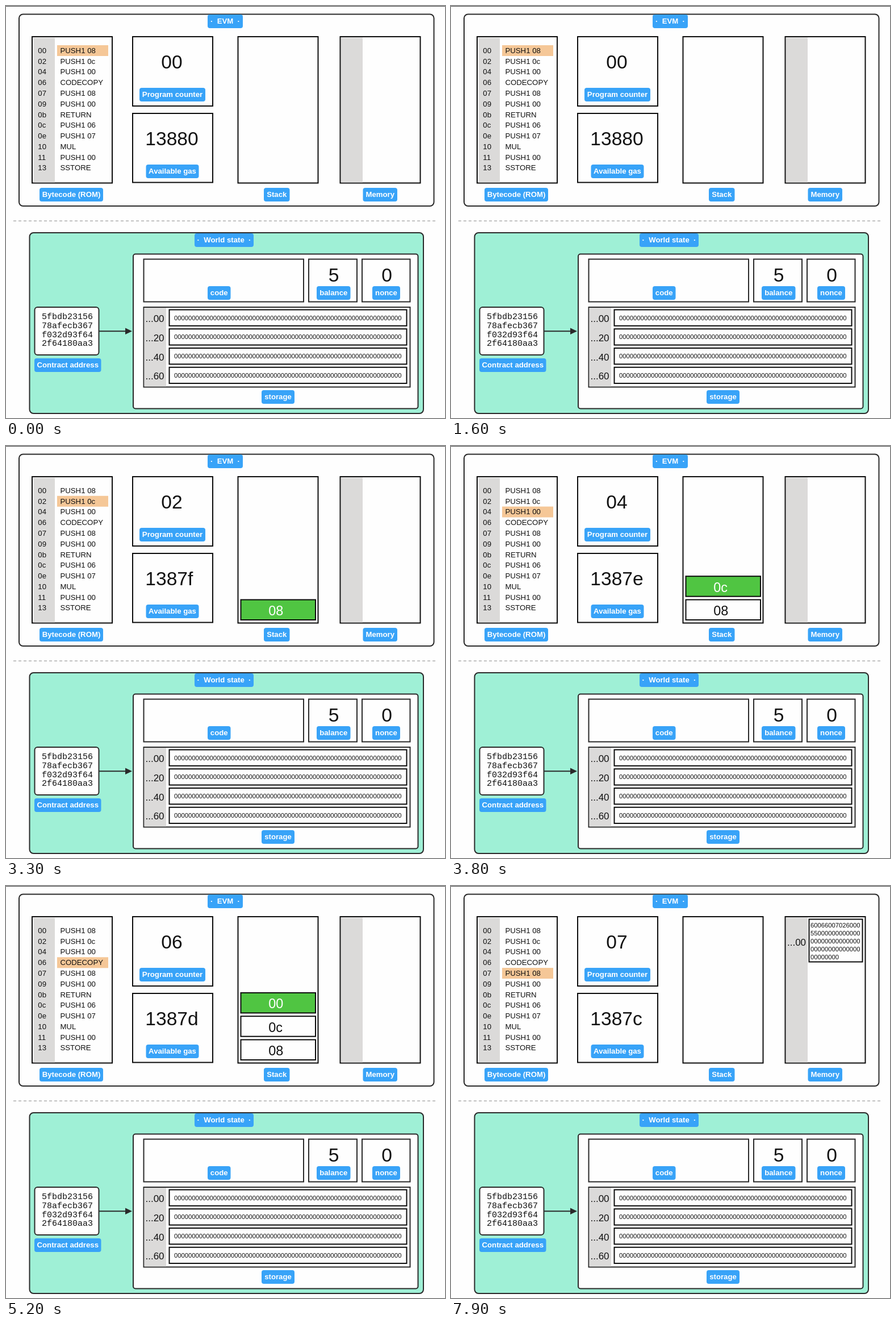
Write an HTML page that moves like this. It is 773 by 725 pixels and loops after 8 s.

```html
<!DOCTYPE html>
<html lang="en">
<head>
<meta charset="utf-8">
<title>EVM execution</title>
<style>
  html, body { margin: 0; width: 100%; height: 100%; overflow: hidden; background: #fefefe; }
  svg { display: block; width: 773px; height: 725px; }
  text { font-family: "Liberation Sans", Arial, sans-serif; fill: #111; white-space: pre; }
  .code { font-size: 13.2px; }
  .big { font-size: 33.6px; }
  .item { font-size: 23.4px; }
  .offset { font-size: 17px; }
  .word { font-size: 11.25px; }
  .mono { font: 15px "Liberation Mono", "Courier New", monospace; }
  .label { font-size: 13.2px; font-weight: bold; fill: #fff; text-anchor: middle; }
  .mid { text-anchor: middle; }
  .top { fill: #fff; }
</style>
</head>
<body>
<svg id="stage" viewBox="0 0 773 725"></svg>
<script>
const LOOP = 8000;
const GREY = '#dbdad9', INK = '#2a2a2a', BLUE = '#38a3f8', GREEN = '#50c542';

const PROGRAM = [
  ['00', 'PUSH1 08'], ['02', 'PUSH1 0c'], ['04', 'PUSH1 00'], ['06', 'CODECOPY'],
  ['07', 'PUSH1 08'], ['09', 'PUSH1 00'], ['0b', 'RETURN'], ['0c', 'PUSH1 06'],
  ['0e', 'PUSH1 07'], ['10', 'MUL'], ['11', 'PUSH1 00'], ['13', 'SSTORE']
];
const STEPS = [
  { at: 0, gas: '13880', stack: [] },
  { at: 1700, gas: '1387f', stack: ['08'] },
  { at: 3400, gas: '1387e', stack: ['08', '0c'] },
  { at: 5050, gas: '1387d', stack: ['08', '0c', '00'] },
  { at: 6700, gas: '1387c', stack: [], memory: '600660070260005500'.padEnd(64, '0') }
];
const ROW = 18.77;

const fill = (x1, y1, x2, y2, color, rx = 0) =>
  `<rect x="${x1}" y="${y1}" width="${x2 - x1}" height="${y2 - y1}" rx="${rx}" fill="${color}"/>`;
const box = (x1, y1, x2, y2, color = '#fefefe', rx = 0, stroke = '#0c0c0c') =>
  `<rect x="${x1}" y="${y1}" width="${x2 - x1}" height="${y2 - y1}" rx="${rx}" fill="${color}" stroke="${stroke}" stroke-width="2"/>`;
const text = (x, y, cls, str) => `<text x="${x}" y="${y}" class="${cls}">${str}</text>`;
const label = (x1, x2, y, str) =>
  fill(x1, y, x2, y + 24, BLUE, 4) + text((x1 + x2) / 2, y + 16, 'label', str);
const titled = str => `·\u00a0\u00a0${str}\u00a0\u00a0·`;

function machine() {
  return fill(0, 0, 773, 1, '#444') +
    box(23, 14.5, 753.5, 352, '#fefefe', 7, INK) +
    label(355, 417, 15, titled('EVM')) +
    box(46, 54, 187, 311.5) + fill(49, 56, 86, 310.5, GREY) +
    '<g id="highlight">' + fill(90, 69, 180, 88, '#f5c797') + '</g>' +
    PROGRAM.map(([pc, op], i) => {
      const y = 82.9 + i * ROW;
      return text(56.3, y, 'code', pc) + text(95.5, y, 'code', op);
    }).join('') +
    box(223, 54, 364, 176) + box(223, 189, 364, 310.5) +
    box(408.5, 54, 549.5, 311.5) +
    box(588.5, 54, 729.5, 311.5) + fill(590, 55.5, 628, 310.5, GREY) +
    label(235, 351, 144, 'Program counter') + label(246.5, 339.5, 279, 'Available gas') +
    label(59, 171, 320, 'Bytecode (ROM)') + label(454, 499.5, 320, 'Stack') +
    label(628.5, 689, 320, 'Memory');
}

function world() {
  const address = ['5fbdb23156', '78afecb367', 'f032d93f64', '2f64180aa3'];
  const slots = ['00', '20', '40', '60'];
  return '<path d="M13 378.3H759" stroke="#b0b0b0" stroke-width="1.5" stroke-dasharray="5 4"/>' +
    box(41.5, 399, 735, 717, '#9ff0d6', 7, INK) +
    label(332, 436, 400, titled('World state')) +
    box(224, 436.5, 725.5, 708.5, '#fefefe', 4, INK) +
    box(242.5, 445.5, 524, 520.5, '#fefefe', 0, INK) +
    box(533, 445.5, 618, 520.5, '#fefefe', 0, INK) +
    box(627, 445.5, 711.5, 520.5, '#fefefe', 0, INK) +
    text(577, 484.5, 'big mid', '5') + text(670.5, 484.5, 'big mid', '0') +
    label(355, 395.5, 493, 'code') + label(547, 606.5, 493, 'balance') +
    label(645, 694, 493, 'nonce') +
    box(242.5, 530, 711.5, 670.5, '#fefefe', 0, INK) + fill(243.5, 531, 282, 669.5, GREY) +
    slots.map((slot, i) => {
      const y = 534.5 + i * 33.75;
      return box(287.5, y, 705.5, y + 28.3) +
        text(245.5, y + 21.5, 'offset', '...' + slot) +
        text(296, y + 18, 'word', '0'.repeat(64));
    }).join('') +
    label(450, 508, 676, 'storage') +
    box(50.5, 530, 163.5, 614, '#fefefe', 5, INK) +
    address.map((line, i) => text(63, 551 + i * 15.8, 'mono', line)).join('') +
    label(50, 167.5, 620, 'Contract address') +
    `<path d="M164 572.3H212" stroke="${INK}" stroke-width="2"/>` +
    `<path d="M210 566.5L222 572.3L210 578.1Z" fill="${INK}"/>`;
}

function stackItems(stack) {
  return stack.map((value, i) => {
    const top = i === stack.length - 1;
    const y = 270.5 - i * 41.3;
    return box(413.5, y, 545, y + 35.5, top ? GREEN : '#fefefe') +
      text(462.3, y + 27.5, top ? 'item top' : 'item', value);
  }).join('');
}

function memoryCell(bytes) {
  return text(592, 104.8, 'offset', '...00') + box(630.5, 58.5, 724.5, 133.5) +
    bytes.match(/.{1,14}/g).map((line, i) => text(633, 73 + i * 14, 'word', line)).join('');
}

const stage = document.getElementById('stage');
stage.innerHTML = machine() + world() + '<g id="state"></g>';
const highlight = document.getElementById('highlight');
const state = document.getElementById('state');
let shown = -1;

function draw(now) {
  const index = STEPS.findLastIndex(step => step.at <= now % LOOP);
  if (index !== shown) {
    shown = index;
    const { gas, stack, memory } = STEPS[index];
    highlight.setAttribute('transform', `translate(0 ${index * ROW})`);
    state.innerHTML = text(292, 110, 'big mid', PROGRAM[index][0]) +
      text(245.3, 245, 'big', gas) +
      stackItems(stack) + (memory ? memoryCell(memory) : '');
  }
}

const start = performance.now();
function tick() {
  draw(performance.now() - start);
  requestAnimationFrame(tick);
}
tick();
</script>
</body>
</html>
```
